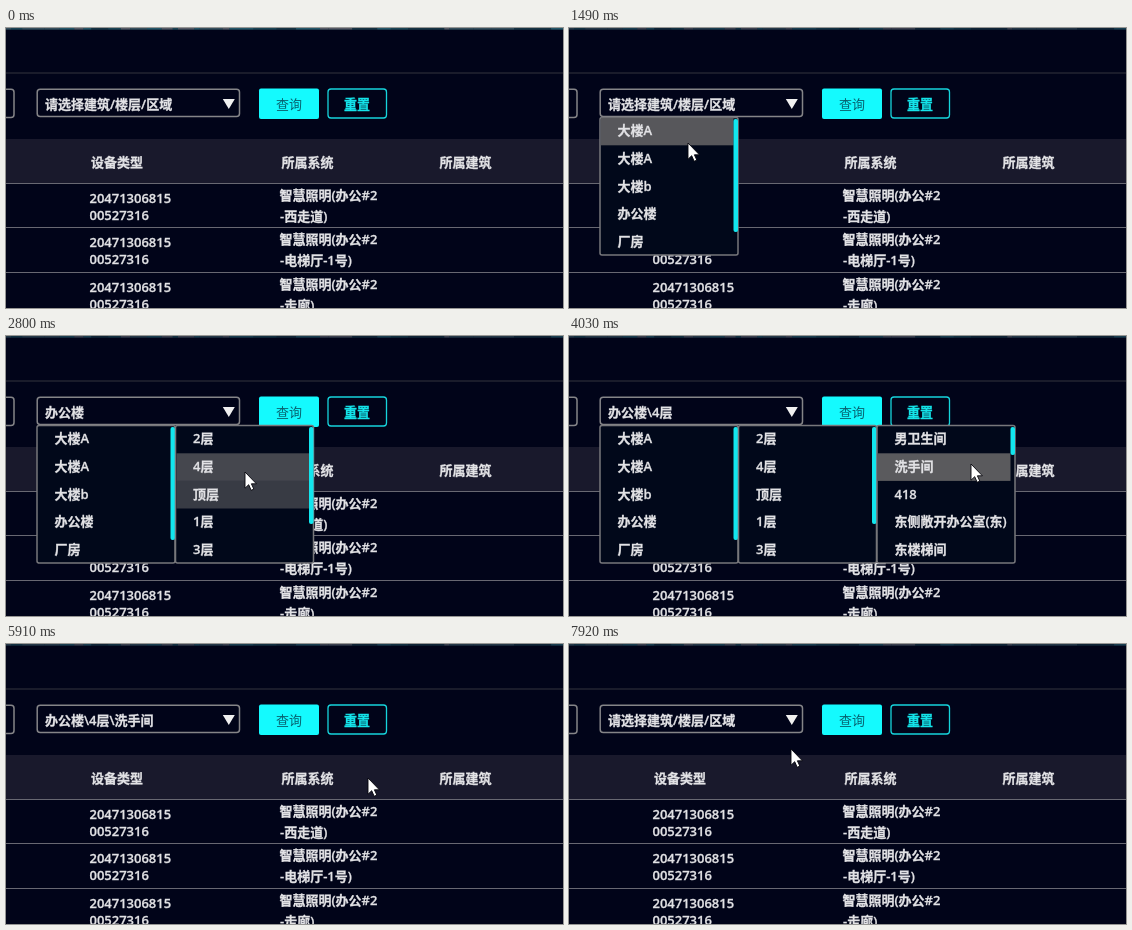
Animation, 557 px wide and 280 px high, one loop 7.99 s. Source, as an HTML page:

```html
<!DOCTYPE html>
<html lang="zh-CN">
<head>
<meta charset="utf-8">
<style>
  html, body { margin: 0; width: 100%; height: 100%; overflow: hidden; background: #010419; }
  svg { display: block; width: 557px; height: 280px; }
  text {
    font: 600 13px 'Open Sans', 'Noto Sans CJK SC', 'Noto Sans CJK', sans-serif;
    fill: #e2e2e5; stroke: #e2e2e5; stroke-width: 0.3; white-space: pre;
  }
  .query { fill: #07616f; stroke: none; font-weight: 400; }
  .reset { fill: #14e4ea; stroke: #14e4ea; }
</style>
</head>
<body>
<svg id="stage" viewBox="0 0 557 280"></svg>
<script>
const LOOP = 7990;
const FADE = 300;
const ROW_TOP = 89, ROW_H = 27.6;

const menus = [
  { x: 31, thumb: 113, open: 1000, items: ['大楼A', '大楼A', '大楼b', '办公楼', '厂房'] },
  { x: 169.5, thumb: 97, open: 1950, items: ['2层', '4层', '顶层', '1层', '3层'] },
  { x: 308, thumb: 28, open: 3400, items: ['男卫生间', '洗手间', '418', '东侧敞开办公室(东)', '东楼梯间'] }
];
const CLOSE = 5250;

// [time, selected value]
const values = [
  [0, '请选择建筑/楼层/区域'], [1950, '办公楼'], [3400, '办公楼\\4层'],
  [CLOSE, '办公楼\\4层\\洗手间'], [7180, '请选择建筑/楼层/区域']
];

// [time, x, y] of the pointer tip
const path = [
  [420, 214, 236], [780, 221, 97], [920, 221, 77], [1060, 221, 77],
  [1360, 119, 115], [1580, 119, 115], [1850, 88, 183], [2050, 88, 183],
  [2440, 228, 180], [2580, 238, 148], [2720, 239, 136], [2950, 239, 136],
  [3150, 230, 130], [3480, 230, 130], [3900, 402, 128], [4180, 402, 128],
  [4480, 372, 156], [4780, 362, 156], [4960, 362, 134], [5960, 362, 134],
  [6560, 350, 74], [7300, 350, 74], [7760, 222, 105], [LOOP, 222, 105]
];

const stage = document.getElementById('stage');

function add(tag, attrs, parent = stage) {
  const el = document.createElementNS('http://www.w3.org/2000/svg', tag);
  for (const key in attrs) el.setAttribute(key, attrs[key]);
  parent.appendChild(el);
  return el;
}
const rect = (x, y, width, height, fill, extra = {}, parent) =>
  add('rect', { x, y, width, height, fill, ...extra }, parent);
function label(x, middle, str, extra = {}, parent) {
  const el = add('text', { x, y: middle + 4.8, ...extra }, parent);
  el.textContent = str;
  return el;
}

// Sliver of the picture above the page
const strip = add('g', {});
let seed = 11;
const random = () => (seed = seed * 16807 % 2147483647) / 2147483647;
const tones = ['#1c4656', '#25586a', '#37505e', '#565a66', '#173444'];
rect(0, 0, 557, 1.5, '#1b3a49', {}, strip);
for (let x = 0; x < 557;) {
  const w = 5 + random() * 20;
  rect(x, 0, w, 1.5, tones[Math.floor(random() * tones.length)], {}, strip);
  x += w;
}

// Toolbar
const border = { stroke: '#858588', 'stroke-width': 1.5, rx: 3 };
rect(0, 44.5, 557, 1, '#34343f');
rect(-40, 61.2, 48, 28.3, 'none', border);
rect(31.2, 61.2, 202.3, 27.3, 'none', border);
const valueText = label(39, 76, '');
add('path', { d: 'M216.8 71H228.8L222.8 81Z', fill: '#f0f0f0' });
rect(253, 60.5, 60, 30.5, '#14fafe', { rx: 2 });
label(283, 76, '查询', { 'text-anchor': 'middle', class: 'query' });
rect(322, 61, 58.5, 29, 'none', { stroke: '#16d4dc', 'stroke-width': 1.3, rx: 3 });
label(351, 76, '重置', { 'text-anchor': 'middle', class: 'reset' });

// Table
rect(0, 111, 557, 44, '#19192c');
label(85, 134.5, '设备类型');
label(275.5, 134.5, '所属系统');
label(433.5, 134.5, '所属建筑');
['-西走道)', '-电梯厅-1号)', '-走廊)'].forEach((place, i) => {
  const y = Math.round(155 + i * 44.4);
  rect(0, y, 557, 1, '#686872');
  label(83.5, y + 15.2, '20471306815');
  label(83.5, y + 32, '00527316');
  label(273.5, y + 12.6, '智慧照明(办公#2');
  label(274, y + 32.8, place);
});

// Cascading menus
for (const menu of menus) {
  const g = menu.group = add('g', {});
  rect(menu.x, 89.5, 138, 137.5, '#01081a', { stroke: '#77777b', 'stroke-width': 1.5, rx: 2 }, g);
  menu.rows = menu.items.map((item, i) => {
    const y = ROW_TOP + i * ROW_H;
    const hover = rect(menu.x + 1, y + 0.7, 132.5, ROW_H, '#5a5a5d', {}, g);
    label(menu.x + 17.5, y + 13.6, item, {}, g);
    return hover;
  });
  rect(menu.x + 133.5, 91, 4.5, menu.thumb, '#12e6ee', { rx: 2 }, g);
}

const pointer = add('path', {
  d: 'M0 0V16.2L3.7 12.7L6.2 18.3L8.8 17.1L6.4 11.8H11.4Z',
  fill: '#fff', stroke: '#05050c', 'stroke-width': 0.9
});

const ease = p => p * p * (3 - 2 * p);

function pointerAt(t) {
  if (t < path[0][0]) return null;
  const i = path.findIndex(step => step[0] > t);
  if (i < 0) return path[path.length - 1].slice(1);
  const [t0, x0, y0] = path[i - 1], [t1, x1, y1] = path[i];
  const p = ease((t - t0) / (t1 - t0));
  return [x0 + (x1 - x0) * p, y0 + (y1 - y0) * p];
}

const isOpen = (menu, t) => t >= menu.open && t < CLOSE;

function hoveredRow(menu, t) {
  const tip = pointerAt(t);
  if (!tip || !isOpen(menu, t) || tip[0] < menu.x || tip[0] > menu.x + 134) return -1;
  return Math.floor((tip[1] - ROW_TOP) / ROW_H);
}

// Averaging recent hover states gives a fade that depends on time alone
function hoverLevels(menu, t) {
  const samples = 20, levels = menu.items.map(() => 0);
  for (let i = 0; i < samples; i++) {
    const row = hoveredRow(menu, t - i * FADE / samples);
    if (row >= 0 && row < levels.length) levels[row] += 1 / samples;
  }
  return levels.map(Math.sqrt);
}

function draw(t) {
  strip.setAttribute('opacity', t < 70 ? 1 : 0.7);
  valueText.textContent = values.filter(v => v[0] <= t).pop()[1];
  for (const menu of menus) {
    const open = isOpen(menu, t);
    menu.group.setAttribute('display', open ? 'inline' : 'none');
    if (open) hoverLevels(menu, t).forEach((level, i) => menu.rows[i].setAttribute('opacity', level));
  }
  const tip = pointerAt(t);
  pointer.setAttribute('display', tip ? 'inline' : 'none');
  if (tip) pointer.setAttribute('transform', `translate(${tip[0]} ${tip[1]})`);
}

const start = performance.now();
function tick() {
  draw((performance.now() - start) % LOOP);
  requestAnimationFrame(tick);
}
tick();
</script>
</body>
</html>
```
